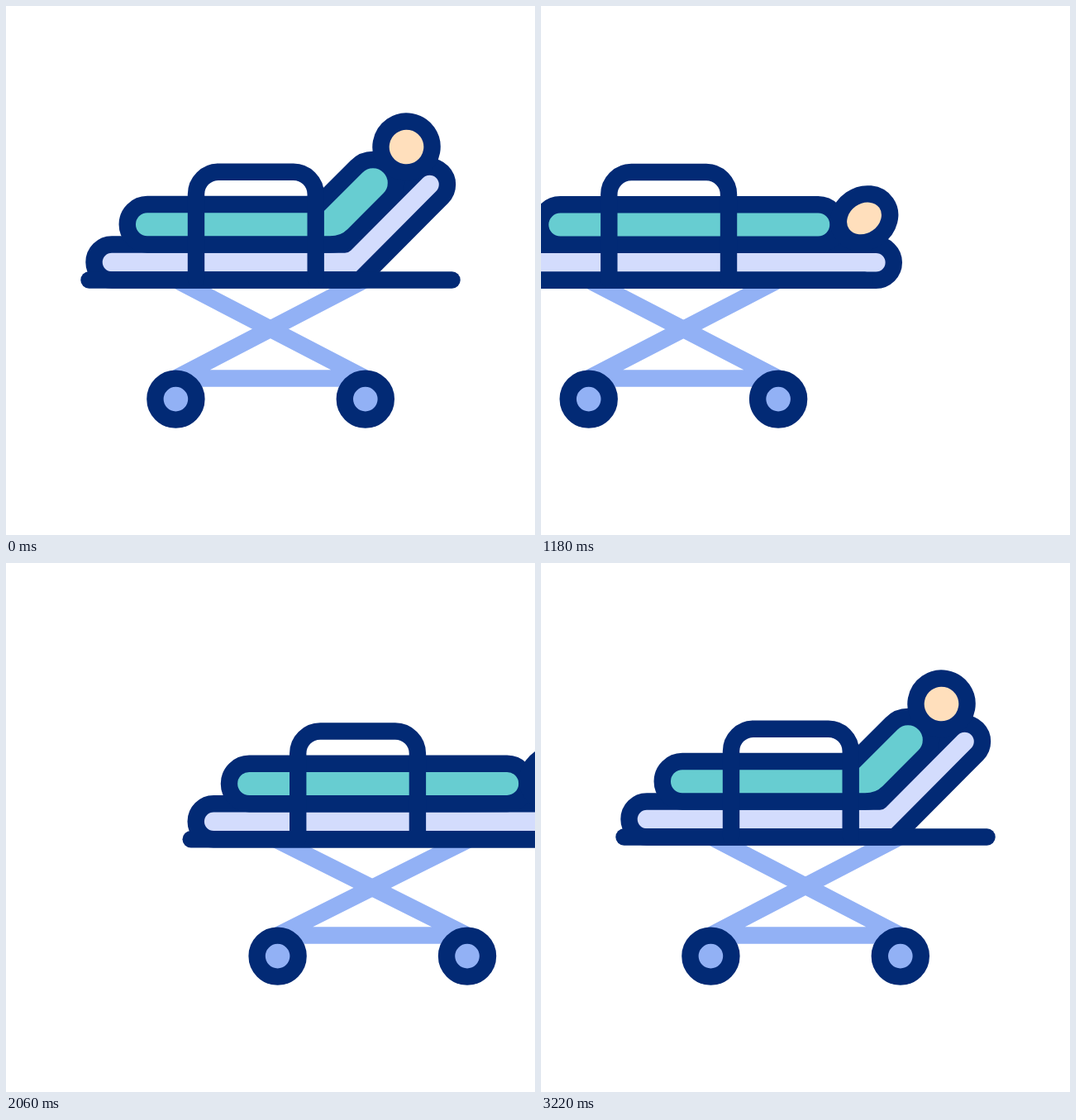
An HTML page for the animation above (3.6 s loop, 640x640 px).

```html
<!DOCTYPE html>
<html lang="en">
<head>
<meta charset="utf-8">
<title>Stretcher</title>
<style>
  html, body { margin: 0; width: 100%; height: 100%; overflow: hidden; background: #fff; }
  svg { display: block; width: 100vw; height: 100vh; }
  #cart { fill: none; stroke: #022a75; stroke-width: 20.4; stroke-linecap: round; stroke-linejoin: round; }
  #legs { stroke: #92b1f5; }
  .wheel { fill: #92b1f5; }
  #mattress { fill: #d3dcfd; }
  #torso { fill: #67cdd1; }
  #head { fill: #ffdfbc; }
</style>
</head>
<body>
<svg viewBox="0 0 640 640">
  <defs>
    <g id="cart">
      <path id="legs"/>
      <circle class="wheel" cx="205.4" cy="475.6" r="25"/>
      <circle class="wheel" cx="434.8" cy="475.6" r="25"/>
      <g id="bed">
        <path id="mattress"/>
        <path id="torso"/>
        <ellipse id="head"/>
        <path d="M100.5 331.5H539.5"/>
        <path d="M230 331V227.7a27 27 0 0 1 27-27H347.7a27 27 0 0 1 27 27V331"/>
      </g>
    </g>
  </defs>
  <use id="leaving" href="#cart"/>
  <use id="arriving" href="#cart"/>
</svg>
<script>
const LOOP = 3600;
const $ = id => document.getElementById(id);
const set = (id, name, value) => $(id).setAttribute(name, value);
const smooth = u => u * u * (3 - 2 * u);
const span = (t, from, to) => Math.min(1, Math.max(0, (t - from) / (to - from)));

// Cubic easing with control points (a, 0) and (b, 1)
function ease(u, a, b) {
  let lo = 0, hi = 1;
  for (let i = 0; i < 24; i++) {
    const m = (lo + hi) / 2, n = 1 - m;
    if (3 * m * n * n * a + 3 * m * m * n * b + m * m * m < u) lo = m; else hi = m;
  }
  return smooth(lo);
}

// Half-round end facing up to the right by the given tilt
function cap(x, y, r, tilt) {
  const dx = r * Math.sin(tilt), dy = r * Math.cos(tilt);
  return `L${x - dx} ${y - dy}A${r} ${r} 0 0 1 ${x + dx} ${y + dy}`;
}

// flat: 0 with the backrest up, 1 lying level
function pose(flat) {
  const mix = (up, level) => up + (level - up) * flat;
  const tilt = mix(Math.PI / 4, 0);

  set('mattress', 'd', `M128 331.5A21.5 21.5 0 0 1 128 288.5H${mix(410, 430)}` +
    cap(mix(512.5, 553), mix(216, 310), 21.5, tilt) + `L${mix(428, 415)} 331.5Z`);

  set('torso', 'd', `M171 288.5A24.2 24.2 0 0 1 171 240H378.4` +
    cap(mix(444, 483), mix(214, 264.2), mix(28, 24.2), tilt) +
    `L${mix(420, 428)} ${mix(277.6, 288.5)}Q409.6 288.5 392 288.5Z`);

  const x = mix(484.5, 538.7), y = mix(170.5, 256.6);
  set('head', 'cx', x);
  set('head', 'cy', y);
  set('head', 'rx', mix(31, 32.5));
  set('head', 'ry', mix(31, 28));
  set('head', 'transform', `rotate(-35 ${x} ${y})`);
}

function draw(t) {
  pose(t < 1200 ? smooth(span(t, 0, 600)) : 1 - ease(span(t, 2420, 3220), 0.82, 0.49));

  // Suspension: four dips while rolling
  const phase = span(t, 800, 2400) * 8 % 2;
  const dip = 12.4 * smooth(phase < 1 ? phase : 2 - phase);
  const top = 331 + dip * 1.55;
  set('bed', 'transform', `translate(0 ${dip})`);
  set('legs', 'd', `M205 ${top}L435 450.5H205L435 ${top}`);

  set('leaving', 'x', -619.5 * smooth(span(t, 800, 2000)));
  set('arriving', 'x', 634 * (1 - smooth(span(t, 1200, 2400))));
  set('leaving', 'visibility', t < 2000 ? 'visible' : 'hidden');
  set('arriving', 'visibility', t >= 1200 ? 'visible' : 'hidden');
}

function tick() {
  draw(performance.now() % LOOP);
  requestAnimationFrame(tick);
}
tick();
</script>
</body>
</html>
```
